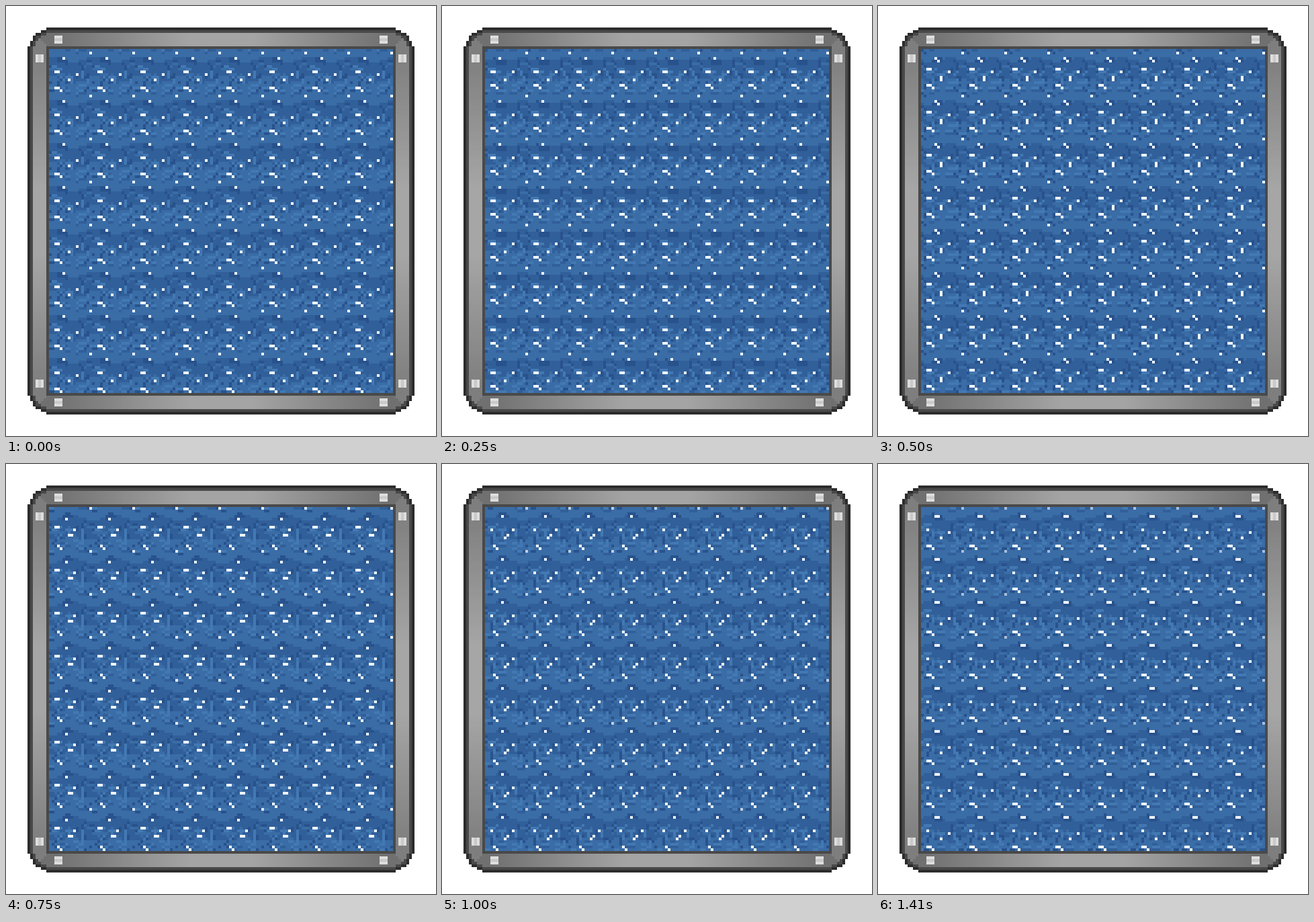
An HTML page with a canvas for the animation above (1.51 s loop, 640 by 640 pixels).

```html
<!DOCTYPE html>
<html lang="en">
<head>
<meta charset="utf-8">
<title>Rippling water in a metal frame</title>
<style>
  html, body { margin: 0; width: 100%; height: 100%; overflow: hidden; background: #fff; }
  canvas { display: block; width: 640px; height: 640px; image-rendering: pixelated; }
</style>
</head>
<body>
<canvas id="stage" width="160" height="160"></canvas>
<script>
const ctx = document.getElementById('stage').getContext('2d');
const SIZE = 160, TILE = 16, STEPS = 6, STEP_MS = 250, LOOP_MS = 1510;
const EDGE = 8, RIM = 15;
const TAU = 2 * Math.PI;

const clamp = (v, lo, hi) => Math.max(lo, Math.min(hi, v));
const wrap = v => (v % TILE + TILE) % TILE;
const gray = v => `rgb(${v} ${v} ${v})`;

function box(c, color, x, y, w = 1, h = 1) {
  c.fillStyle = color;
  c.fillRect(x, y, w, h);
}

// ---- metal frame ----

// Cells inward from the rounded outline; a and b count from the nearest edges.
function depth(a, b) {
  if (a >= RIM || b >= RIM) return Math.min(a, b) - EDGE;
  return Math.floor(RIM - EDGE - 0.3 - Math.hypot(RIM - a, RIM - b));
}

// Polished metal: brightest at the middle of each bar.
function metal(along, dark, bright) {
  const t = clamp((Math.abs(along - 79.5) - 12) / 50, 0, 1);
  return gray(Math.round(bright + (dark - bright) * t));
}

function drawFrame() {
  for (let y = 0; y < SIZE; y++) for (let x = 0; x < SIZE; x++) {
    const a = Math.min(x, SIZE - 1 - x), b = Math.min(y, SIZE - 1 - y);
    const d = depth(a, b);
    if (d < 0) continue;
    let color = b < a ? metal(x, 112, 164) : metal(y, 126, 166);
    if (d === 0) color = gray(44);
    if (d === 1 || Math.min(a, b) === RIM) color = gray(73);
    box(ctx, color, x, y);
  }
  for (const near of [11, 146]) for (const along of [18, 139]) {
    box(ctx, gray(222), along, near, 3, 3);
    box(ctx, gray(201), along, near + 1, 3, 1);
    box(ctx, gray(222), near, along, 3, 3);
    box(ctx, gray(201), near + 1, along, 1, 3);
  }
}

// ---- water: one wrapping tile of random strokes, swayed by a ripple ----
let seed = 11;
function random(n) {
  seed = (seed * 16807) % 2147483647;
  return Math.floor(seed / 2147483647 * n);
}

const blue = s => `rgb(${40 + 9 * s} ${82 + 13 * s} ${140 + 13 * s})`;

const water = Array.from({ length: TILE }, (_, y) =>
  Array(TILE).fill(Math.round(1.6 - 0.6 * Math.cos(TAU * (y - 7.5) / TILE))));
for (let i = 0; i < 44; i++) {
  const x = random(TILE), y = random(TILE);
  const tall = random(4) === 0;
  const w = tall ? 1 : 2 + random(3), h = tall ? 3 : 1 + random(2);
  for (let j = 0; j < w * h; j++)
    water[wrap(y + Math.floor(j / w))][wrap(x + j % w)] = i % 4;
}

// Swings half a cell to each side, once per loop.
const swing = (home, peak, t) => Math.round(home + 0.49 * Math.cos(TAU * (t - peak) / STEPS));

// Glints: home x and y, then the step at which each reaches its peak
const glints = [
  [5.5, 3.15, 3.5, 2.75],
  [2, 7.75, 0, 5.5],
  [2.7, 7.75, 1.5, 5.5],
  [9.91, 8.3, 0, 5.5],
  [7.1, 10.75, 3.6, 0],
  [2.25, 13.75, 3.5, 4.5],
  [3, 13.75, 0, 4.5],
  [4, 14.75, 0, 4.5]
];

function makeTile(step) {
  const tile = document.createElement('canvas');
  tile.width = tile.height = TILE;
  const c = tile.getContext('2d');
  const turn = TAU * step / STEPS;
  for (let y = 0; y < TILE; y++) for (let x = 0; x < TILE; x++) {
    const dx = Math.round(0.7 * Math.sin(turn + TAU * y / TILE));
    const dy = Math.round(0.8 * Math.cos(turn + TAU * x / TILE));
    box(c, blue(water[wrap(y + dy)][wrap(x + dx)]), x, y);
  }
  // Each glint smears over a short moment, so it may cover two cells.
  for (const [x, y, px, py] of glints)
    for (const t of [step - 0.25, step + 0.25])
      box(c, '#f2f9ff', swing(x, px, t), swing(y, py, t));
  // One slow star fades toward the end of the loop.
  c.globalAlpha = Math.min(1, 1.4 - 0.16 * step);
  box(c, '#f2f9ff', 15, swing(0.5, 1, step));
  return ctx.createPattern(tile, 'repeat');
}

const patterns = Array.from({ length: STEPS }, (_, step) => makeTile(step));

drawFrame();
const start = performance.now();
function tick() {
  const time = (performance.now() - start) % LOOP_MS;
  const step = Math.min(STEPS - 1, Math.floor(time / STEP_MS));
  box(ctx, patterns[step], 16, 16, 128, 128);
  requestAnimationFrame(tick);
}
tick();
</script>
</body>
</html>
```
